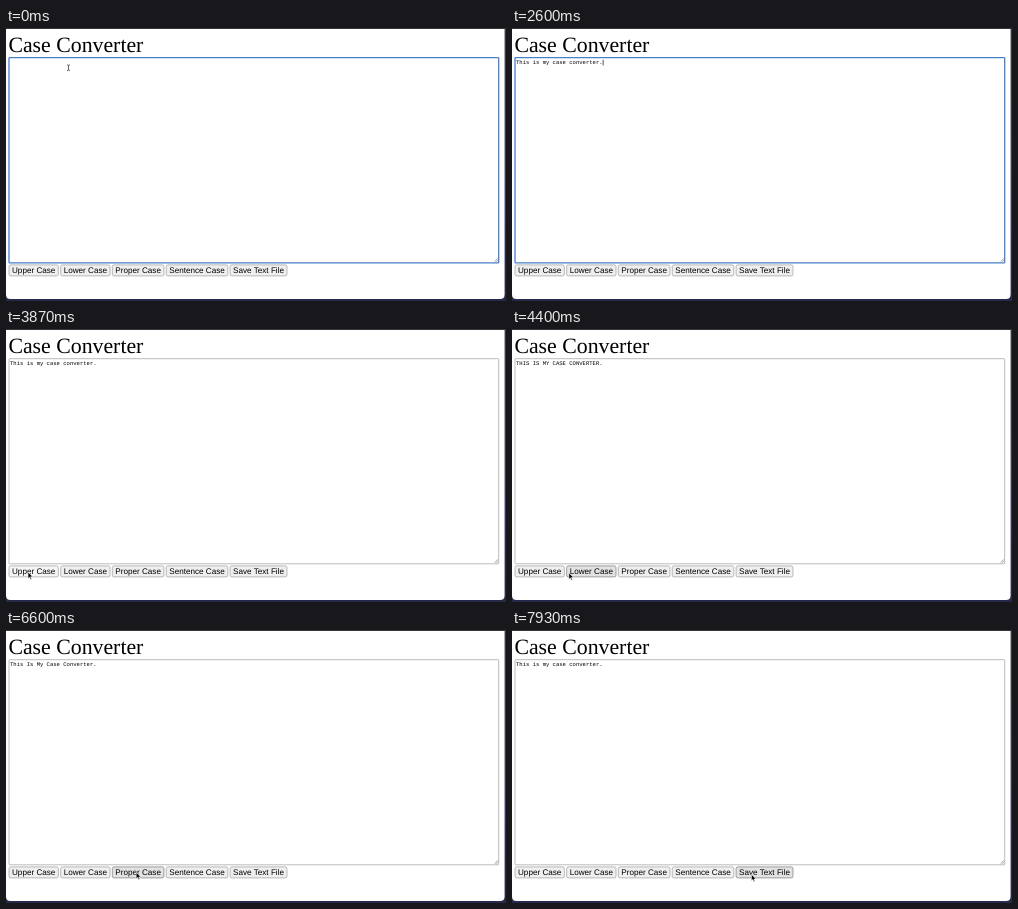
These frames come from a looping animation (500 px wide and 273 px high, 8 s). An HTML page:

```html
<!DOCTYPE html>
<html lang="en">
<head>
<meta charset="utf-8">
<title>Case Converter</title>
<style>
  html, body { margin: 0; width: 100%; height: 100%; overflow: hidden; background: #2b2c33; }
  svg { display: block; width: 100vw; height: 100vh; }
  text { text-rendering: geometricPrecision; white-space: pre; }
  .title { font: 21.8px "Liberation Serif", "Times New Roman", serif; }
  .typed { font: 5.56px "Liberation Mono", "Courier New", monospace; }
  .button text { font: 8.15px "Liberation Sans", Arial, sans-serif; text-anchor: middle; }
  .button rect { fill: #efefef; stroke: #a0a0a0; stroke-width: .7; }
  .button.hover rect { fill: #e2e2e2; stroke: #7c7c7c; }
  .button.down rect { fill: #f5f5f5; stroke: #a0a0a0; }
  #area { fill: #fff; stroke: #a6a6a6; stroke-width: .75; }
  #area.focus { stroke: #4a80cb; stroke-width: 1.3; }
</style>
</head>
<body>
<svg viewBox="0 0 500 273" preserveAspectRatio="none">
  <defs>
    <linearGradient id="desk" x2="0" y2="1">
      <stop offset="0" stop-color="#35353a"/>
      <stop offset=".5" stop-color="#3c3a44"/>
      <stop offset=".65" stop-color="#34306a"/>
      <stop offset="1" stop-color="#262a4a"/>
    </linearGradient>
  </defs>
  <rect width="500" height="273" fill="url(#desk)"/>
  <path d="M0 1H498.6V266.5Q498.6 271 494 271H4.5Q0 271 0 266.5Z" fill="#fff"/>
  <text class="title" x="2.4" y="24.3">Case Converter</text>
  <rect id="area" x="3" y="29.7" width="489.7" height="205.1" rx=".6"/>
  <path d="M488.6 233.7L491.8 230.5M490.4 233.7L491.8 232.3" stroke="#777" stroke-width=".7"/>
  <text class="typed" id="typed" x="4" y="36"></text>
  <path id="caret" d="M.4 31.8V37.4" stroke="#000" stroke-width=".7"/>
  <g id="buttons"></g>
  <g id="cursor">
    <path id="beam" d="M-1.5 -2.8Q0 -2.8 0 -2Q0 -2.8 1.5 -2.8M0 -2V2M-1.5 2.8Q0 2.8 0 2Q0 2.8 1.5 2.8" fill="none" stroke="#333" stroke-width=".75"/>
    <path id="arrow" d="M0 0V6.6L1.5 5.2L2.5 7.5L3.6 7.1L2.6 4.8H4.7Z" fill="#000" stroke="#fff" stroke-width=".6"/>
  </g>
</svg>
<script>
const LOOP = 8000, FPS = 15, LEFT = 4, CHAR = 5.56 * 0.6;
const PHRASE = "This is my case converter.";
const TYPE_START = 130, KEY_TIME = 96;
const $ = id => document.getElementById(id);

const HOME = { x: 62.5, y: 39.7 };
const MOVES = [
  { from: 2730, to: 3400, x: 18.4, y: 229.5 },
  { from: 3400, to: 3670, x: 22, y: 243 },
  { from: 4145, to: 4540, x: 70, y: 244 },
  { from: 5345, to: 5600, x: 128.3, y: 242.3 },
  { from: 6550, to: 7000, x: 175.4, y: 241.4 },
  { from: 7345, to: 7930, x: 239.4, y: 244.2 }
];

const CLICKS = [
  { down: 3800, up: 3930, change: s => s.toUpperCase() },
  { down: 4800, up: 4930, change: s => s.toLowerCase() },
  { down: 6130, up: 6200, change: s => s.replace(/\b\w/g, c => c.toUpperCase()) },
  { down: 7070, up: 7130, change: s => s }
];

function add(parent, tag, attrs) {
  const el = document.createElementNS("http://www.w3.org/2000/svg", tag);
  for (const key in attrs) el.setAttribute(key, attrs[key]);
  return parent.appendChild(el);
}

// buttons sit in a row, each as wide as its label plus padding
let edge = 3;
const BUTTONS = ["Upper Case", "Lower Case", "Proper Case", "Sentence Case", "Save Text File"].map(label => {
  const group = add($("buttons"), "g", { class: "button" });
  const rect = add(group, "rect", { x: edge, y: 236.9, height: 11, rx: 1.7 });
  const text = add(group, "text", { y: 245.2 });
  text.textContent = label;
  const width = text.getComputedTextLength() + 6, left = edge;
  rect.setAttribute("width", width);
  text.setAttribute("x", left + width / 2);
  edge += width + 2.3;
  return { group, left, right: left + width };
});

const clamp = (v, lo, hi) => Math.min(hi, Math.max(lo, v));
const ease = k => k * k * (3 - 2 * k);

function pointerAt(t) {
  return MOVES.reduce((p, m) => {
    const k = ease(clamp((t - m.from) / (m.to - m.from), 0, 1));
    return { x: p.x + (m.x - p.x) * k, y: p.y + (m.y - p.y) * k };
  }, HOME);
}

const show = (el, on) => el.setAttribute("visibility", on ? "visible" : "hidden");
const place = (el, x, y) => el.setAttribute("transform", `translate(${x} ${y})`);

function draw(now) {
  // whole steps at the playback rate, with slack for rounded times
  const t = Math.floor((now % LOOP) * FPS / 1000 + 0.1) * 1000 / FPS + 4;

  const count = clamp(Math.floor((t - TYPE_START) / KEY_TIME) + 1, 0, PHRASE.length);
  const done = CLICKS.filter(c => c.up <= t).pop();
  const typed = PHRASE.slice(0, count);
  $("typed").textContent = done ? done.change(typed) : typed;

  const focused = t < CLICKS[0].down;
  $("area").classList.toggle("focus", focused);
  show($("caret"), focused && t >= 70);
  place($("caret"), LEFT + count * CHAR, 0);

  const { x, y } = pointerAt(t);
  const seen = t < 70 || t >= 2800, low = y > 235.5;
  place($("cursor"), x, y);
  show($("beam"), seen && !low);
  show($("arrow"), seen && low);

  const pressed = CLICKS.some(c => t >= c.down && t < c.up);
  for (const { group, left, right } of BUTTONS) {
    const hover = y >= 237 && x >= left && x <= right;
    group.classList.toggle("hover", hover);
    group.classList.toggle("down", hover && pressed);
  }
}

let start;
function tick(now) {
  start ??= now;
  draw(now - start);
  requestAnimationFrame(tick);
}
draw(0);
requestAnimationFrame(tick);
</script>
</body>
</html>
```
